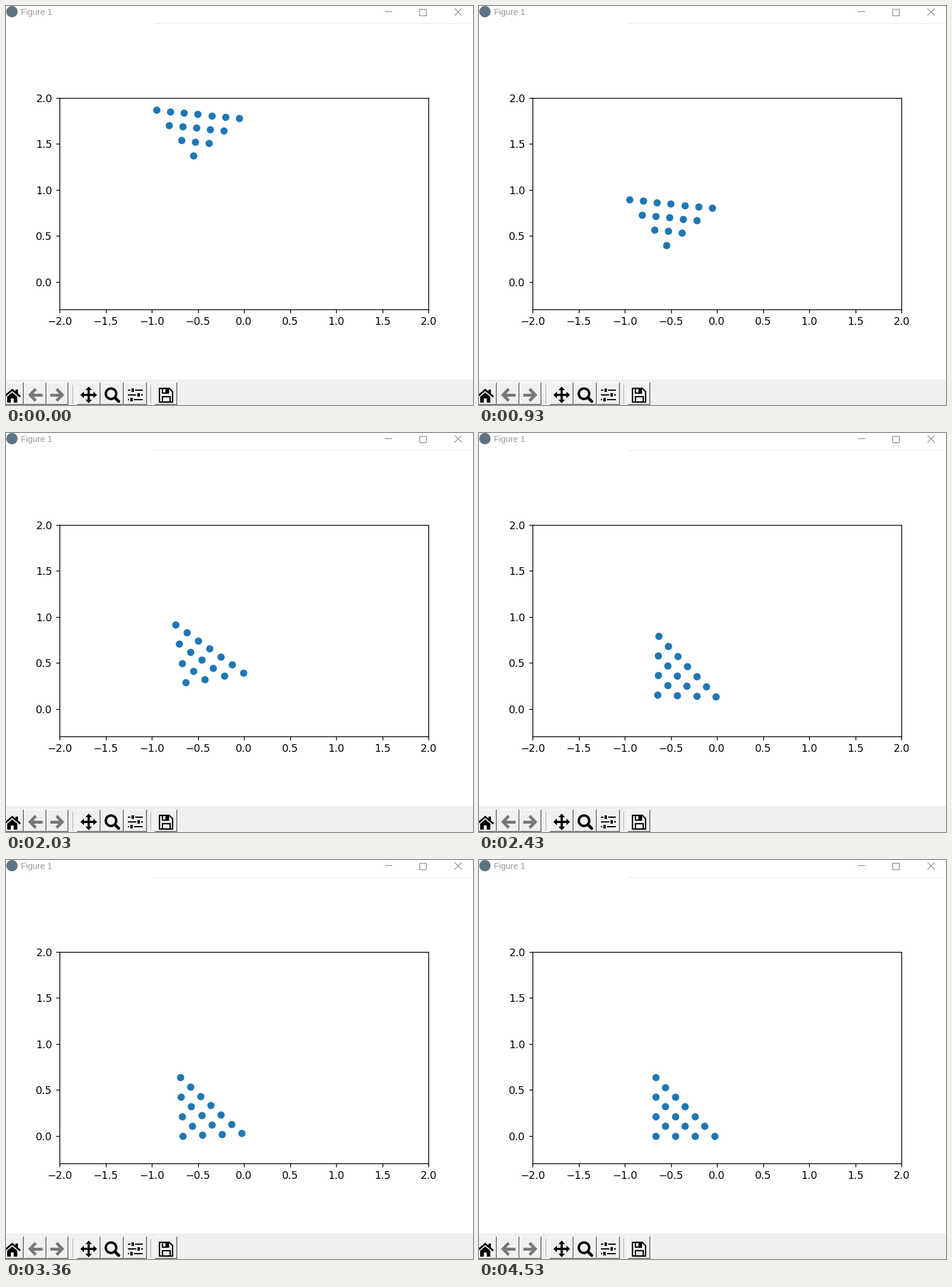
Animation, 785 px wide and 672 px high, one loop 4920 ms. Source, as a matplotlib script:

```python
import numpy as np
import matplotlib.pyplot as plt
from matplotlib.animation import FuncAnimation
from matplotlib.patches import Circle, Polygon, Rectangle

W, H, DPI = 785, 672, 125
LOOP, TICK = 4920, 20
REFRESH = 78.2        # ms between screen refreshes
UNIT = 155            # pixels per data unit
SPACING = 0.15 * UNIT
ORIGIN = (400, 463.75)
PT = 72 / DPI
FACE, SHADE, DARK = "#f0f0f0", "#a0a0a0", "#696969"

fig = plt.figure(figsize=(W / DPI, H / DPI), dpi=DPI, facecolor="white")

# ---- window chrome, in pixels with y pointing down ----
ui = fig.add_axes([0, 0, 1, 1])
ui.set(xlim=(0, W), ylim=(H, 0))
ui.axis("off")


def line(xs, ys, width=1, color="black", cap="butt"):
    ui.plot(xs, ys, color=color, lw=width * PT, solid_capstyle=cap,
            solid_joinstyle="miter")


def box(x0, y0, x1, y1, color="black"):
    ui.add_patch(Rectangle((x0, y0), x1 - x0, y1 - y0, fc=color, lw=0))


def frame(x0, y0, x1, y1, width=1, color="black"):
    ui.add_patch(Rectangle((x0, y0), x1 - x0, y1 - y0, fill=False,
                           ec=color, lw=width * PT))


def poly(*points, color="black"):
    ui.add_patch(Polygon(points, fc=color, lw=0))


def title_bar():
    gray = "#777777"
    ui.add_patch(Circle((10, 9.5), 9.5, fc="#5f7482", lw=0))
    ui.text(25, 15, "Figure 1", family="Liberation Sans", size=14.3 * PT,
            color="#999999", va="baseline")
    box(250, 29, W, 30, "#e5e5e5")
    box(637, 9, 649, 10, gray)
    frame(695, 5, 706, 16, 1, gray)
    line([754, 766], [4, 16], 1, gray)
    line([754, 766], [16, 4], 1, gray)


def button(x0, x1, y0=634, y1=H):
    box(x0, y0, x1, y1, DARK)
    box(x0, y0, x1 - 1, y1 - 1, "white")
    box(x0 + 1, y0 + 1, x1 - 1, y1 - 1, SHADE)
    box(x0 + 1, y0 + 1, x1 - 2, y1 - 2, FACE)


def separator(x):
    box(x, 638, x + 1, 669, SHADE)
    box(x + 1, 638, x + 2, 669, "white")


def home_icon():
    line([-3, 10.5, 24], [658, 646.5, 658], 3)
    box(16, 646, 20, 653)
    poly((2, 658), (10.5, 651), (19, 658), (19, 668), (13, 668), (13, 661),
         (8, 661), (8, 668), (2, 668))


def arrow_icon(cx, side):
    gray = "#787878"
    line([cx - side, cx + side * 8.5, cx - side], [645, 655, 665], 5, gray)
    line([cx - side * 12, cx + side * 7], [655, 655], 5, gray)


def pan_icon(cx=139, cy=655):
    line([cx - 10, cx + 10], [cy, cy], 3.6)
    line([cx, cx], [cy - 10, cy + 10], 3.6)
    for dx, dy in ((1, 0), (-1, 0), (0, 1), (0, -1)):
        bx, by = cx + 8 * dx, cy + 8 * dy
        poly((cx + 14 * dx, cy + 14 * dy), (bx - 5.5 * dy, by + 5.5 * dx),
             (bx + 5.5 * dy, by - 5.5 * dx))


def zoom_icon():
    ui.add_patch(Circle((176.5, 653), 8.8, fill=False, ec="black", lw=4 * PT))
    line([183, 189.5], [659.5, 666], 5, cap="round")


def sliders_icon():
    for y, knob in ((647, 213), (655, 223), (663, 211)):
        box(205, y - 1, 230, y + 1)
        box(knob - 4, y - 4, knob + 4, y + 4, FACE)
        box(knob - 2, y - 3, knob + 2, y + 3)


def save_icon():
    ui.add_patch(Polygon([(258, 644), (274.5, 644), (280, 649.5), (280, 667),
                          (258, 667)], fill=False, ec="black", lw=2.2 * PT))
    frame(263, 644, 273, 651.5, 2.2)
    box(268, 644, 273, 651)
    frame(263, 658, 275.5, 667, 2.2)


def toolbar():
    box(0, 629, W, H, FACE)
    for x0, x1 in ((-9, 30), (30, 68), (68, 105), (119, 159), (159, 198),
                   (198, 237), (250, 288)):
        button(x0, x1)
    separator(112)
    separator(243)
    home_icon()
    arrow_icon(49, -1)
    arrow_icon(86, 1)
    pan_icon()
    zoom_icon()
    sliders_icon()
    save_icon()


title_bar()
toolbar()

# ---- plot ----
ax = fig.add_axes([90 / W, 160.75 / H, 4 * UNIT / W, 2.3 * UNIT / H])
ax.set(xlim=(-2, 2), ylim=(-0.3, 2))
ax.set_xticks(np.arange(-2, 2.1, 0.5))
ax.set_yticks(np.arange(0, 2.1, 0.5))
dots, = ax.plot([], [], "o", color="#1f77b4", ms=6)

# Rigid triangle: rows of 7, 5, 3 and 1 dots about their common centre.
BODY = np.array([(i, j) for j in range(4) for i in range(j - 3, 4 - j)], float)
BODY = (BODY - BODY.mean(axis=0)) * SPACING


def curve(*keys):
    """Cubic path through four keys of (step, value, value, ...)."""
    keys = np.array(keys)
    start = keys[0, 0]
    fit = np.polyfit(keys[:, 0] - start, keys[:, 1:], 3)
    return lambda k: [np.polyval(c, k - start) for c in fit.T]


# Bounce: centre x, centre y, tilt.  Rocking on the floor: centre x, tilt.
bounce = curve((18, 321.7, 402.3, 13.4), (21, 325.6, 381, 23.5),
               (26, 330.5, 379, 35.4), (31, 335.6, 406, 46.5))
rock = curve((33, 337.8, 50.6), (36, 336, 44.8), (39.5, 327.4, 38),
             (43, 330.6, 42.4))
REST = np.array([331.8, 45])


def pose(k):
    if k <= 15:
        return 320.4, 201.5 + 7.25 * k + 0.444 * k * k, 5.8
    if k < 33:
        return bounce(k)
    x, tilt = REST + (rock(min(k, 43)) - REST) * 0.4 ** max(k - 43, 0)
    return x, np.inf, tilt    # the floor sets the height


def draw(n):
    k = int((n + 1) * TICK / REFRESH + 0.1)
    cx, cy, tilt = pose(k)
    c, s = np.cos(np.radians(tilt)), np.sin(np.radians(tilt))
    dx, dy = np.array([[c, -s], [s, c]]) @ BODY.T
    cy = min(cy, ORIGIN[1] - dy.max())
    dots.set_data((cx + dx - ORIGIN[0]) / UNIT, (ORIGIN[1] - cy - dy) / UNIT)
    return dots,


anim = FuncAnimation(fig, draw, frames=LOOP // TICK, interval=TICK,
                     init_func=lambda: draw(0), repeat=True, repeat_delay=0)
plt.show()
```
